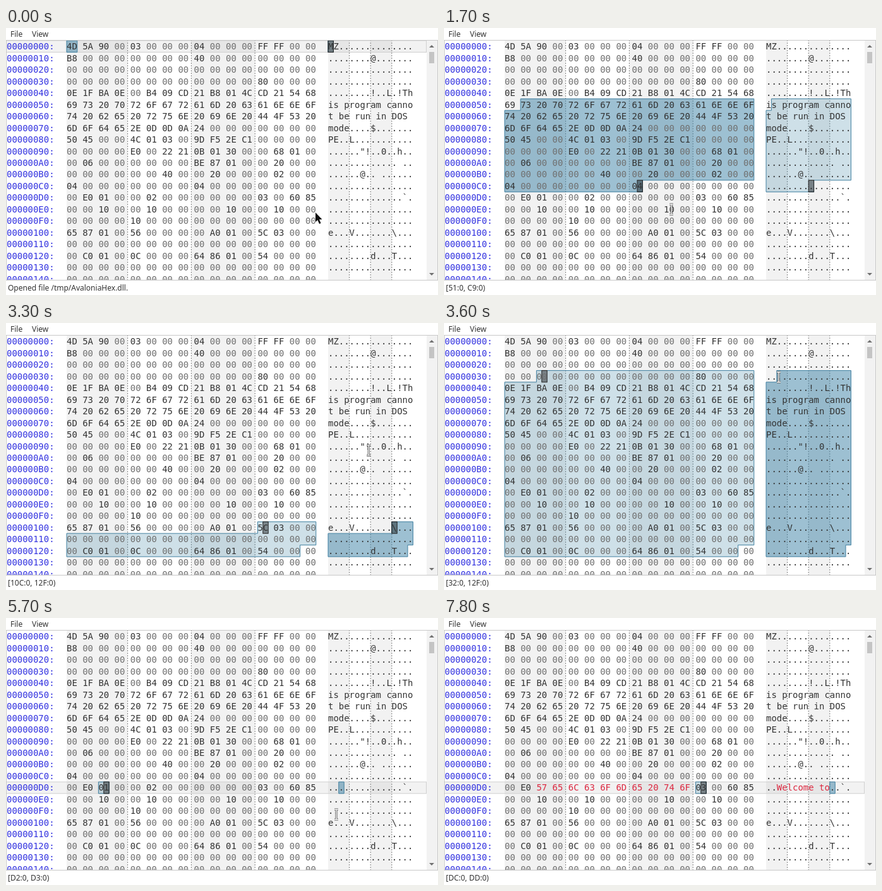
An HTML page with a canvas that plays this animation: 684x424 px, repeating every 8000 ms.

```html
<!DOCTYPE html>
<html lang="en">
<head>
<meta charset="utf-8">
<title>Hex editor</title>
<style>
html, body { margin: 0; width: 100%; height: 100%; overflow: hidden; background: #fff; }
canvas { display: block; }
</style>
</head>
<body>
<canvas id="stage" width="684" height="424"></canvas>
<script>
const ctx = document.getElementById('stage').getContext('2d');
const LOOP = 8000, STEP = 100, LAG = 150;
const TOP = 20, ROW = 18.48, BASE = 14.2, CH = 8.4, ROWS = 21;
const MONO = '13.953px "DejaVu Sans Mono", monospace';
const UI = '12px "Noto Sans", "Open Sans", sans-serif';
const INK = '#333', ZERO = '#707070', LABEL = '#3434e0', EDITED = '#dc2840';
const HEX = { x: 96, pitch: CH * 3, cell: CH * 2, gap: CH / 2 };
const ASCII = { x: 510, pitch: CH, cell: CH, gap: 0 };
const TYPED = 'Welcome to', TYPE_AT = 6600, TYPE_STEP = 120, EDIT = 0xD2;

// File contents
const file = new Uint8Array(ROWS * 16);
const put = (at, hex) => hex.match(/../g).forEach((h, i) => file[at + i] = parseInt(h, 16));
const putText = (at, s) => [...s].forEach((c, i) => file[at + i] = c.charCodeAt(0));
put(0x00, '4D5A90000300000004000000FFFF0000B8');
put(0x18, '40');
put(0x3C, '80');
put(0x40, '0E1FBA0E00B409CD21B8014CCD21');
putText(0x4E, 'This program cannot be run in DOS mode.\r\r\n$');
put(0x80, '504500004C0103009DF52EC1');
put(0x94, 'E00022210B013000006801');
put(0xA1, '06');
put(0xA8, 'BE8701000020');
put(0xB6, '40000020');
put(0xBD, '02');
put(0xC0, '04');
put(0xC8, '04');
put(0xD1, 'E001000002');
put(0xDC, '03006085');
put(0xE2, '10000010');
put(0xEA, '10000010');
put(0xF4, '10');
put(0x100, '6587010056');
put(0x109, 'A001005C03');
put(0x121, 'C001000C');
put(0x128, '6486010054');

// Pointer path: time, x, y
const PATH = [
  [0, 490, 293], [900, 130, 122], [1000, 130, 122], [1300, 159, 150],
  [1650, 360, 288], [1800, 360, 288], [2200, 545, 350], [2300, 545, 350],
  [2600, 600, 380], [2900, 633, 357], [3100, 633, 357], [3450, 530, 86],
  [3900, 530, 86], [4100, 570, 108], [4200, 570, 108], [5100, 527, 275],
  [5200, 527, 275], [5500, 523, 312], [5700, 523, 312], [5900, 590, 445]
];
// The active caret starts hidden and flips at these times
const BLINKS = [200, 700, 1000, 3600, 4100, 4700, 6200, 6700, 7200, 7700];

function pointer(t) {
  const i = PATH.findIndex(k => k[0] > t);
  if (i < 0) return PATH[PATH.length - 1].slice(1);
  const [t0, x0, y0] = PATH[i - 1], [t1, x1, y1] = PATH[i];
  const f = (t - t0) / (t1 - t0);
  return [x0 + (x1 - x0) * f, y0 + (y1 - y0) * f];
}

function byteAt(pane, [x, y]) {
  const col = Math.floor((x - pane.x) / pane.pitch);
  return Math.floor((y - TOP) / ROW) * 16 + Math.max(0, Math.min(15, col));
}

function stateAt(t) {
  const typed = Math.max(0, Math.min(TYPED.length, Math.floor((t - TYPE_AT) / TYPE_STEP) + 1));
  const first = t < 3100, active = first ? HEX : ASCII;
  let anchor = 0, caret = 0;
  if (t >= 5300) anchor = caret = EDIT + typed;
  else if (t >= 1000) {
    const [begin, end] = first ? [1000, 1650] : [2950, 3450];
    anchor = first ? 0x51 : 0x12E;
    caret = byteAt(active, pointer(Math.max(begin, Math.min(t - LAG, end))));
  }
  return {
    typed, active, caret,
    from: Math.min(anchor, caret), to: Math.max(anchor, caret),
    blinkOn: BLINKS.filter(b => b <= t).length % 2 === 1
  };
}

function text(s, x, y, color) {
  ctx.fillStyle = color;
  ctx.fillText(s, x, y);
}

function rect(x, y, w, h, color) {
  ctx.fillStyle = color;
  ctx.fillRect(x, y, w, h);
}

function poly(points, fill, stroke, width = 1) {
  ctx.beginPath();
  points.forEach(p => ctx.lineTo(...p));
  ctx.closePath();
  ctx.lineWidth = width;
  if (stroke) { ctx.strokeStyle = stroke; ctx.stroke(); }
  if (fill) { ctx.fillStyle = fill; ctx.fill(); }
}

function groups(pane) {
  const w = pane.pitch * 4, edge = i => pane.x + w * i - (i ? pane.gap : 0);
  for (const i of [0, 2]) rect(edge(i), TOP, edge(i + 1) - edge(i), 380, '#f2f2f2');
  ctx.strokeStyle = '#808080';
  ctx.lineWidth = 1;
  ctx.setLineDash([2, 2]);
  ctx.lineDashOffset = 1;
  for (let i = 1; i < 4; i++) {
    ctx.beginPath();
    ctx.moveTo(edge(i), TOP);
    ctx.lineTo(edge(i), 400);
    ctx.stroke();
  }
  ctx.setLineDash([]);
}

function selection(pane, s) {
  const r0 = s.from >> 4, r1 = s.to >> 4;
  const left = pane.x, right = left + 15 * pane.pitch + pane.cell;
  const x0 = left + (s.from & 15) * pane.pitch;
  const x1 = left + (s.to & 15) * pane.pitch + pane.cell;
  const y0 = TOP + r0 * ROW, y1 = TOP + (r1 + 1) * ROW;
  const shape = r0 === r1
    ? [[x0, y0], [x1, y0], [x1, y1], [x0, y1]]
    : [[x0, y0], [right, y0], [right, y1 - ROW], [x1, y1 - ROW],
       [x1, y1], [left, y1], [left, y0 + ROW], [x0, y0 + ROW]];
  poly(shape, `rgba(60,130,165,${pane === s.active ? .5 : .25})`, '#407f9f');
}

function caretBox(pane, s) {
  if (pane === s.active && !s.blinkOn) return;
  const x = pane.x + (s.caret & 15) * pane.pitch + pane.cell - CH;
  const y = TOP + (s.caret >> 4) * ROW;
  rect(x, y, CH, ROW, 'rgba(0,0,0,.4)');
  ctx.strokeStyle = '#222';
  ctx.lineWidth = 1;
  ctx.strokeRect(x, y, CH, ROW);
}

function bytes(s) {
  ctx.font = MONO;
  for (let r = 0; r < ROWS; r++) {
    const y = Math.round(TOP + r * ROW + BASE);
    text((r * 16).toString(16).toUpperCase().padStart(8, '0') + ':', 1, y, LABEL);
    for (let c = 0; c < 16; c++) {
      const at = r * 16 + c, n = at - EDIT;
      const edited = n >= 0 && n < s.typed;
      const v = edited ? TYPED.charCodeAt(n) : file[at];
      const hex = v.toString(16).toUpperCase().padStart(2, '0');
      const chr = v >= 32 && v < 127 ? String.fromCharCode(v) : '.';
      text(hex, HEX.x + c * HEX.pitch, y, edited ? EDITED : v ? INK : ZERO);
      text(chr, ASCII.x + c * CH, y, edited ? EDITED : INK);
    }
  }
}

function frame() {
  ctx.strokeStyle = '#c8c8c8';
  ctx.lineWidth = 1;
  ctx.strokeRect(.5, 19.5, 683, 381);
  rect(666, 20, 17, 380, '#f2f2f2');
  rect(670, 38, 8, 18, '#c4c4c4');
  poly([[670, 31], [674, 27], [678, 31]], '#707070');
  poly([[670, 389], [674, 393], [678, 389]], '#707070');
}

function beam(width, color) {
  ctx.lineWidth = width;
  ctx.strokeStyle = color;
  ctx.beginPath();
  for (const d of [-8, 8]) { ctx.moveTo(-3, d); ctx.lineTo(3, d); }
  ctx.moveTo(0, -8);
  ctx.lineTo(0, 8);
  ctx.stroke();
}

// An arrow between the panes, a text beam over them
function cursor([x, y]) {
  ctx.save();
  ctx.translate(x, y);
  if (x >= 490 && x < ASCII.x) {
    poly([[0, 0], [0, 15], [3.4, 12], [6, 18], [8.6, 17], [6, 11], [10.5, 11]], '#111', '#fff');
  } else {
    beam(3, '#444');
    beam(1.4, '#fff');
  }
  ctx.restore();
}

function statusText(t, s) {
  const h = n => n.toString(16).toUpperCase();
  return t < 1000 ? 'Opened file /tmp/AvaloniaHex.dll.' : `[${h(s.from)}:0, ${h(s.to + 1)}:0)`;
}

function draw(t) {
  const s = stateAt(t);
  rect(0, 0, 684, 424, '#fff');
  ctx.font = UI;
  text('File', 7, 14, INK);
  text('View', 41, 14, INK);
  text(statusText(t, s), 3, 417, INK);

  ctx.save();
  ctx.beginPath();
  ctx.rect(0, 19, 684, 381);
  ctx.clip();
  groups(HEX);
  groups(ASCII);
  if (s.from === s.to) {
    const y = TOP + (s.from >> 4) * ROW;
    rect(0, y, 665, ROW, 'rgba(128,128,128,.1)');
    ctx.strokeStyle = '#d0d0d0';
    ctx.lineWidth = 1;
    ctx.strokeRect(.5, y, 665, ROW);
  }
  for (const pane of [HEX, ASCII]) {
    selection(pane, s);
    caretBox(pane, s);
  }
  bytes(s);
  ctx.restore();
  frame();
  if (t < 5900) cursor(pointer(t));
}

const start = performance.now();
function tick() {
  const t = (performance.now() - start) % LOOP;
  draw(Math.floor(t / STEP) * STEP);
  requestAnimationFrame(tick);
}
tick();
</script>
</body>
</html>
```
